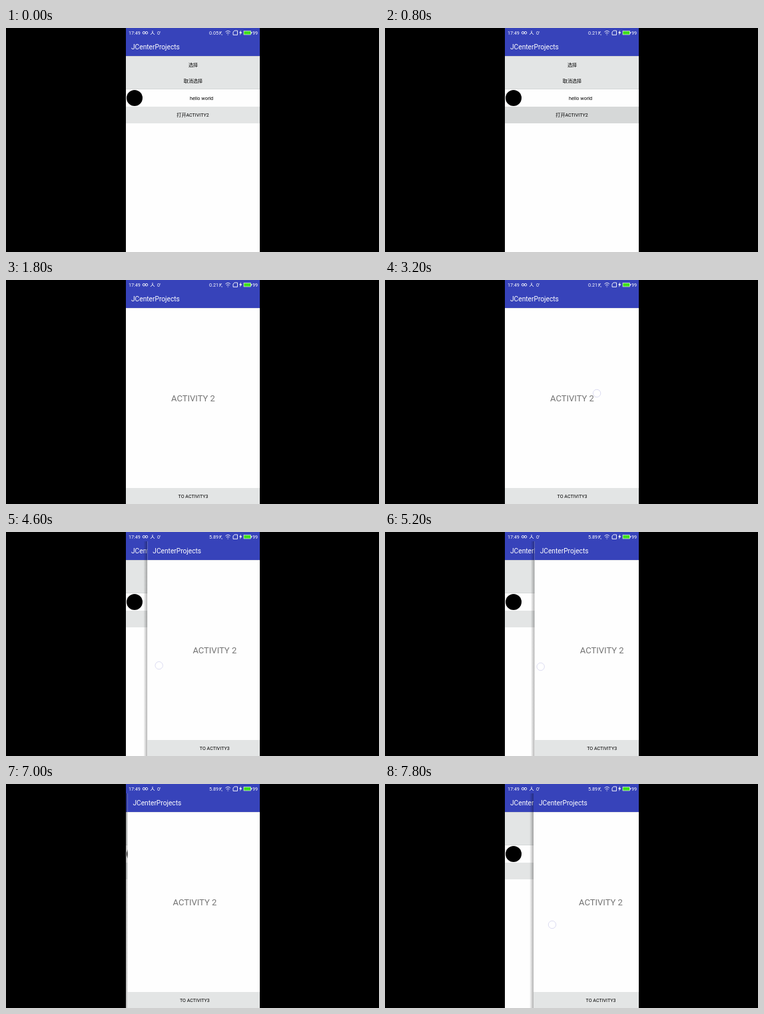
Recreate the animation shown at these times as an HTML page. Size 560 by 336 pixels, loop 8 s.

```html
<!DOCTYPE html>
<html lang="zh">
<head>
<meta charset="utf-8">
<style>
html, body { margin: 0; width: 100%; height: 100%; overflow: hidden; background: #000; }
svg { display: block; width: 560px; height: 336px; font-family: Roboto, "Noto Sans CJK SC", "Noto Sans CJK", sans-serif; }
.title { font-size: 10.2px; fill: #fff; }
.button { font-size: 7.1px; fill: #000; text-anchor: middle; }
.status { font-size: 7.2px; fill: #fff; }
</style>
</head>
<body>
<svg viewBox="0 0 560 336">
  <defs>
    <clipPath id="phone"><rect x="180" width="201" height="336"/></clipPath>
    <linearGradient id="edge"><stop stop-opacity="0"/><stop offset="1" stop-opacity=".3"/></linearGradient>
    <g id="toolbar">
      <rect x="180" y="14" width="201" height="28" fill="#3743ba"/>
      <rect x="180" y="42" width="201" height="1" fill-opacity=".08"/>
      <text class="title" x="188" y="32">JCenterProjects</text>
    </g>
  </defs>
  <rect width="560" height="336"/>
  <g clip-path="url(#phone)">
    <g id="home">
      <rect x="180" y="14" width="201" height="322" fill="#fefefe"/>
      <rect x="180" y="42" width="201" height="49" fill="#e3e5e5"/>
      <rect x="180" y="91" width="201" height="1" fill="#d6d8d8"/>
      <rect id="open" x="180" y="118" width="201" height="25" fill="#e3e5e5"/>
      <circle cx="193" cy="105" r="12"/>
      <text class="button" x="281" y="57.5">选择</text>
      <text class="button" x="281" y="81.5">取消选择</text>
      <text x="276" y="108" font-size="7.25">hello world</text>
      <text class="button" x="280.5" y="133.3">打开ACTIVITY2</text>
      <use href="#toolbar"/>
    </g>
    <g id="page">
      <rect id="shadow" x="174" y="14" width="6" height="322" fill="url(#edge)"/>
      <rect x="180" y="14" width="201" height="322" fill="#fefefe"/>
      <rect x="180" y="312" width="201" height="24" fill="#e3e5e5"/>
      <text x="281" y="182" font-size="13" fill="#757575" text-anchor="middle">ACTIVITY 2</text>
      <text class="button" x="281" y="327">TO ACTIVITY3</text>
      <use href="#toolbar"/>
    </g>
    <circle id="finger" r="5.7" fill="#fff" fill-opacity=".9" stroke="#d4d4ee" stroke-width=".8"/>
    <rect x="180" width="201" height="14" fill="#3743ba"/>
    <g class="status">
      <text x="184" y="9.8">17:49</text>
      <text x="227" y="9.8">0'</text>
      <text id="speed" x="305" y="9.8"></text>
      <text x="320" y="7.5" font-size="4">K</text>
      <text x="323" y="10.5" font-size="4">s</text>
      <text x="370" y="9.8">99</text>
    </g>
    <g fill="none" stroke="#fff" stroke-width=".9">
      <circle cx="207" cy="7.2" r="1.8"/><circle cx="211" cy="7.2" r="1.8"/>
      <path d="M220 4v3l-3 3M220 7l3 3M320.5 10l3-5M329.5 6q3.7-3.4 7.4 0M331 8q2.2-2 4.4 0M332.6 10h1.2M341 6l2-2h4.5v6.4H341z"/>
    </g>
    <path d="M353 3.2l-3 4.3h2l-1 3.6 3.4-4.8h-2z" fill="#fff"/>
    <rect x="357" y="4.4" width="10.5" height="5.6" fill="#3fe01c" stroke="#fff" stroke-width=".6"/>
    <rect x="368" y="6" width="1" height="2.4" fill="#fff"/>
  </g>
</svg>
<script>
const LOOP = 8000, STEP = 200, WIDTH = 201, LEFT = 180;
const OPEN = 1200, DRAG = 3600, RELEASE = 6200, DRAG_AGAIN = 7200;
const el = id => document.getElementById(id);
const show = (id, visible) => el(id).style.display = visible ? '' : 'none';
const move = (id, x, y = 0) => el(id).setAttribute('transform', `translate(${x} ${y})`);
const progress = (t, from, length) => Math.min(1, Math.max(0, (t - from) / length));
const smooth = u => u * u * (3 - 2 * u);
const wave = (t, peak, period) => Math.cos((t - peak) / period * 2 * Math.PI);

function pageOffset(t) {
  if (t < DRAG) return WIDTH * (1 - smooth(progress(t, OPEN, 580)));
  if (t <= RELEASE) return progress(t, DRAG, 400) * (40 + 23 * wave(t, 6100, 1150));
  if (t <= DRAG_AGAIN) return 60 * (1 - progress(t, RELEASE, 1000)) ** 2;
  return 43 * progress(t, DRAG_AGAIN, 600);
}

function fingerPosition(t) {
  if (t === 200) return [290, 140];
  // Circling in the middle has no effect; dragging from the edge moves the page.
  if (t >= 2400 && t < DRAG) return [309 + 26 * wave(t, 2968, 1200), 168.5 - 23 * wave(t, 2888, 1200)];
  if (t > DRAG && t <= RELEASE) {
    const k = (t - 5200) / 1000;
    return [LEFT + pageOffset(t) + 9 - 14 * k, 202 + 3 * k];
  }
  if (t > DRAG_AGAIN) return [LEFT + 71 * progress(t, DRAG_AGAIN, 600), 206 + 5 * progress(t, DRAG_AGAIN, 600)];
}

function draw(now) {
  const t = Math.floor(now % LOOP / STEP) * STEP;
  move('page', pageOffset(t));
  show('shadow', t > DRAG);
  el('open').setAttribute('fill', t >= 400 && t < 1000 ? '#d6d8d8' : '#e3e5e5');
  el('speed').textContent = t < 400 ? '0.05' : t < 3800 ? '0.21' : '5.89';

  const finger = fingerPosition(t);
  show('finger', finger);
  if (finger) move('finger', ...finger);
}

const start = performance.now();
(function tick() {
  draw(performance.now() - start);
  requestAnimationFrame(tick);
})();
</script>
</body>
</html>
```
